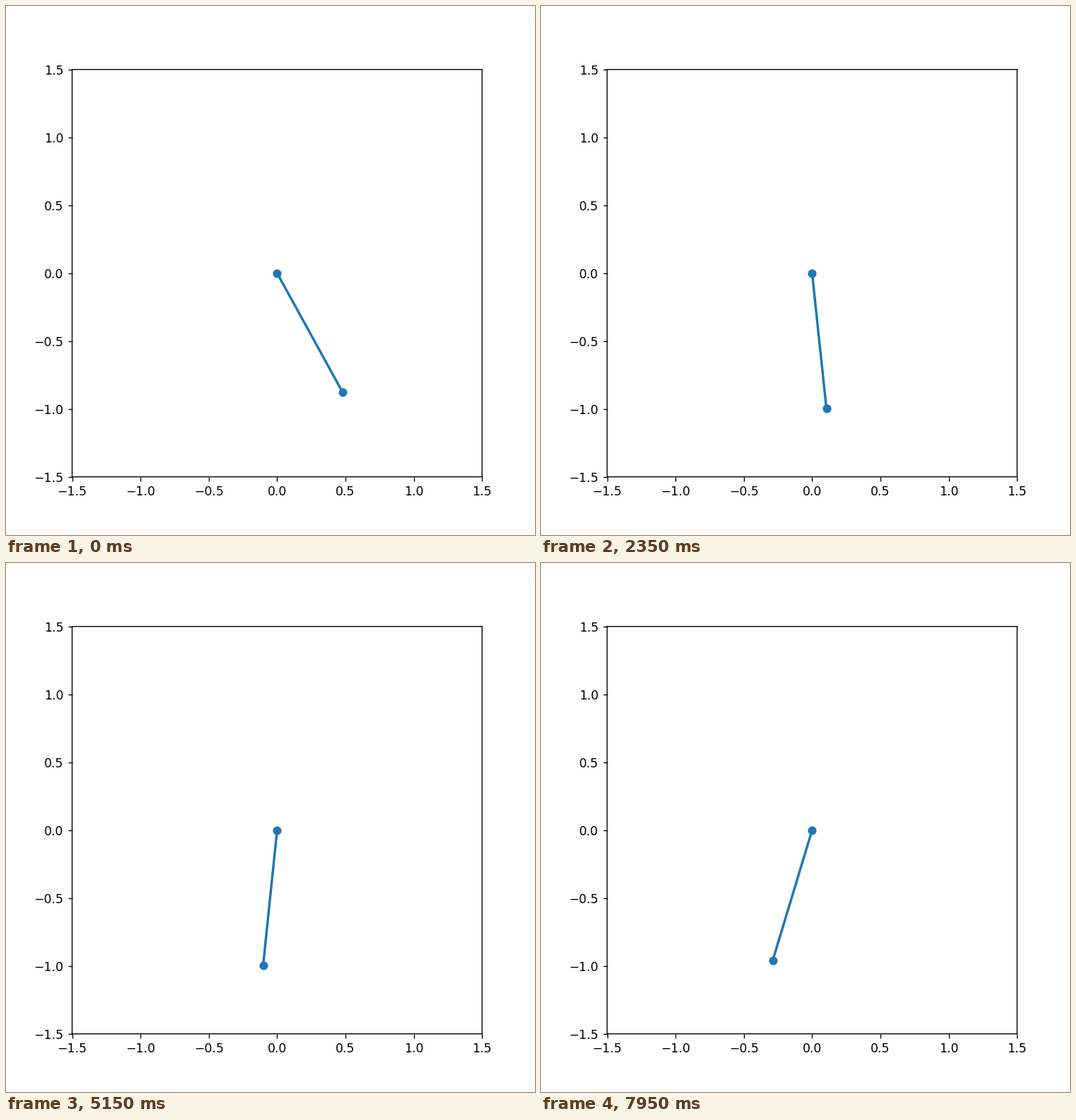
Write a matplotlib script that moves like this. It is 748 px wide and 748 px high and loops after 8 s.

```python
import numpy as np
import matplotlib.pyplot as plt
from matplotlib.animation import FuncAnimation

SIZE, INCHES = 748, 6
FRAMES, INTERVAL = 160, 50
BLUE = "#1f77b4"

GRAVITY, LENGTH, START = 9.81, 1.0, 0.5
times = np.linspace(0, 10, 300)
theta = START * np.cos(np.sqrt(GRAVITY / LENGTH) * times)

# Keep subpixel positions instead of rounding lines to whole pixels.
plt.rcParams["path.snap"] = False

fig, ax = plt.subplots(figsize=(INCHES, INCHES), dpi=SIZE / INCHES)
ax.set_xlim(-1.5, 1.5)
ax.set_ylim(-1.5, 1.5)
ticks = np.arange(-1.5, 1.6, 0.5)
ax.set_xticks(ticks)
ax.set_yticks(ticks)
rod, = ax.plot([], [], lw=2, color=BLUE)
# A scatter moves smoothly; line markers jump between pixels.
balls = ax.scatter([0, 0], [0, 0], s=36, lw=1, color=BLUE)


def update(i):
    ends = np.array([[0, 0],
                     [LENGTH * np.sin(theta[i]), -LENGTH * np.cos(theta[i])]])
    rod.set_data(*ends.T)
    balls.set_offsets(ends)
    return rod, balls


anim = FuncAnimation(fig, update, frames=FRAMES, interval=INTERVAL,
                     repeat=True, repeat_delay=0)
plt.show()
```
